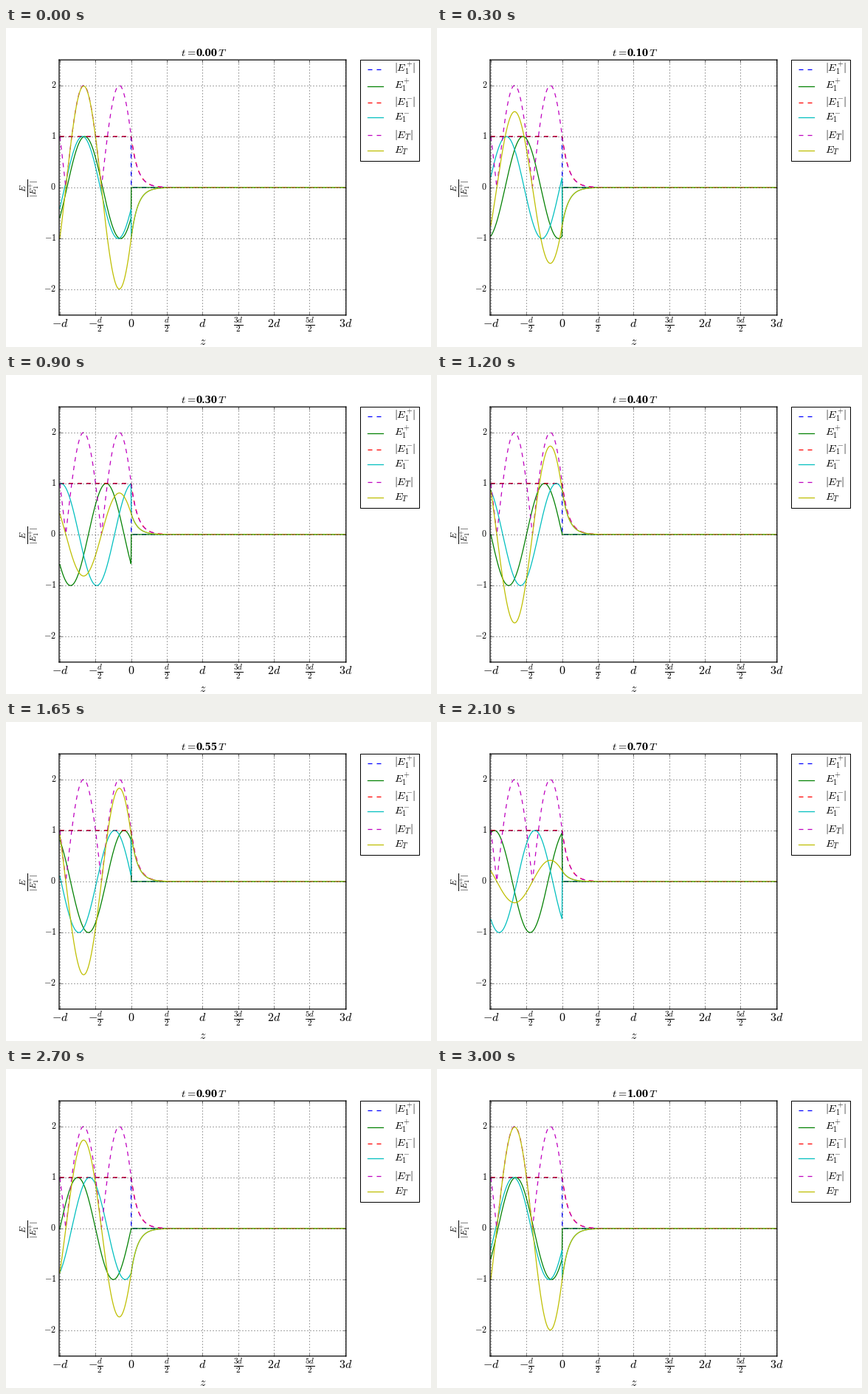
These frames come from a looping animation (576x432 px, 3.15 s). A matplotlib script:

```python
import numpy as np
import matplotlib.pyplot as plt
from matplotlib.animation import FuncAnimation
from matplotlib.lines import Line2D
from matplotlib.patches import Rectangle

W, H, DPI = 576, 432, 72
FRAMES, STEP_MS = 21, 150
LW = 1.25

plt.style.use("classic")
plt.rcParams.update({"savefig.dpi": "figure", "mathtext.fontset": "cm",
                     "lines.linewidth": LW, "grid.linewidth": 0.7})

fig = plt.figure(figsize=(W / DPI, H / DPI), dpi=DPI, facecolor="white")
ax = fig.add_axes([0.125, 0.1, 0.675, 0.8])


def px(x, y):
    """Pixel position from the top left as a figure fraction."""
    return x / W, 1 - y / H


def label(x, y, text, size, **kw):
    kw = {"ha": "center", "va": "baseline", **kw}
    return fig.text(*px(x, y), text, fontsize=size, **kw)


# Axes, grid and tick labels
ax.set_xlim(-1.01, 3.01)
ax.set_ylim(-2.5, 2.5)
ax.set_xticks(np.arange(-1, 3.1, 0.5), labels=[])
ax.set_yticks(range(-2, 3), labels=[])
ax.grid(True)
for spine in ax.spines.values():
    spine.set_snap(False)
    spine.set_linewidth(LW)

x_names = ["-d", r"-\frac{d}{2}", "0", r"\frac{d}{2}", "d",
           r"\frac{3d}{2}", "2d", r"\frac{5d}{2}", "3d"]
for i, name in enumerate(x_names):
    label(72 + 388.8 * (0.01 + 0.5 * i) / 4.02, 405, f"${name}$", 16)
for v in range(-2, 3):
    label(68, 216 - 69.12 * v + 3.2, f"${v}$", 12, ha="right")

label(267, 429, "$z$", 16)
label(32, 216.5, r"$\frac{E}{|E_1^{+}|}$", 16, rotation=90, va="center")

# Title: the value sits between the symbols t and T
label(258, 38, r"$t\hspace{0.08}=\hspace{-0.2}$", 14.4, ha="right")
clock = label(258, 38, "", 12, ha="left", family="DejaVu Serif", weight="bold")
label(287, 38, "$T$", 14.4, ha="left")

# Curves: incident, reflected and total wave, each with its envelope
names = ["|E_1^{+}|", "E_1^{+}", "|E_1^{-}|", "E_1^{-}", "|E_T|", "E_T"]
styles = ["b--", "g-", "r--", "c-", "m--", "y-"]
lines = [ax.plot([], [], style)[0] for style in styles]

# Legend
x0, y0 = px(480.24, 179.5)
x1, y1 = px(559.5, 43.2)
fig.add_artist(Rectangle((x0, y0), x1 - x0, y1 - y0, fc="white", ec="black", lw=1))
for name, line, y in zip(names, lines, [56, 79, 101, 121, 145, 166]):
    (xa, ya), (xb, _) = px(490.3, y), px(510.6, y)
    fig.add_artist(Line2D([xa, xb], [ya, ya], color=line.get_color(),
                          ls=line.get_linestyle()))
    label(526.3, y + 3.5, f"${name}$", 14.4, ha="left")

z = np.linspace(-1, 3, 1000)
k = 2 * np.pi
inside = z < 0
shift = np.pi / 3
decay = np.exp(-k * np.tan(shift) * z.clip(0))
profile = np.where(inside, 2 * np.cos(k * z + shift), decay)
lines[0].set_data(z, np.where(inside, 1.0, 0.0))
lines[2].set_data(z, decay)
lines[4].set_data(z, np.abs(profile))


def update(i):
    t = i / (FRAMES - 1)
    phase = k * t + np.pi / 30
    total = -profile * np.cos(phase)
    lines[1].set_data(z, np.where(inside, -np.cos(phase - k * z - shift), 0))
    lines[3].set_data(z, np.where(inside, -np.cos(phase + k * z + shift), total))
    lines[5].set_data(z, total)
    clock.set_text(f"{t:.2f}")
    return [*lines, clock]


anim = FuncAnimation(fig, update, frames=FRAMES, interval=STEP_MS,
                     repeat=True, repeat_delay=0, blit=False)
plt.show()
```
